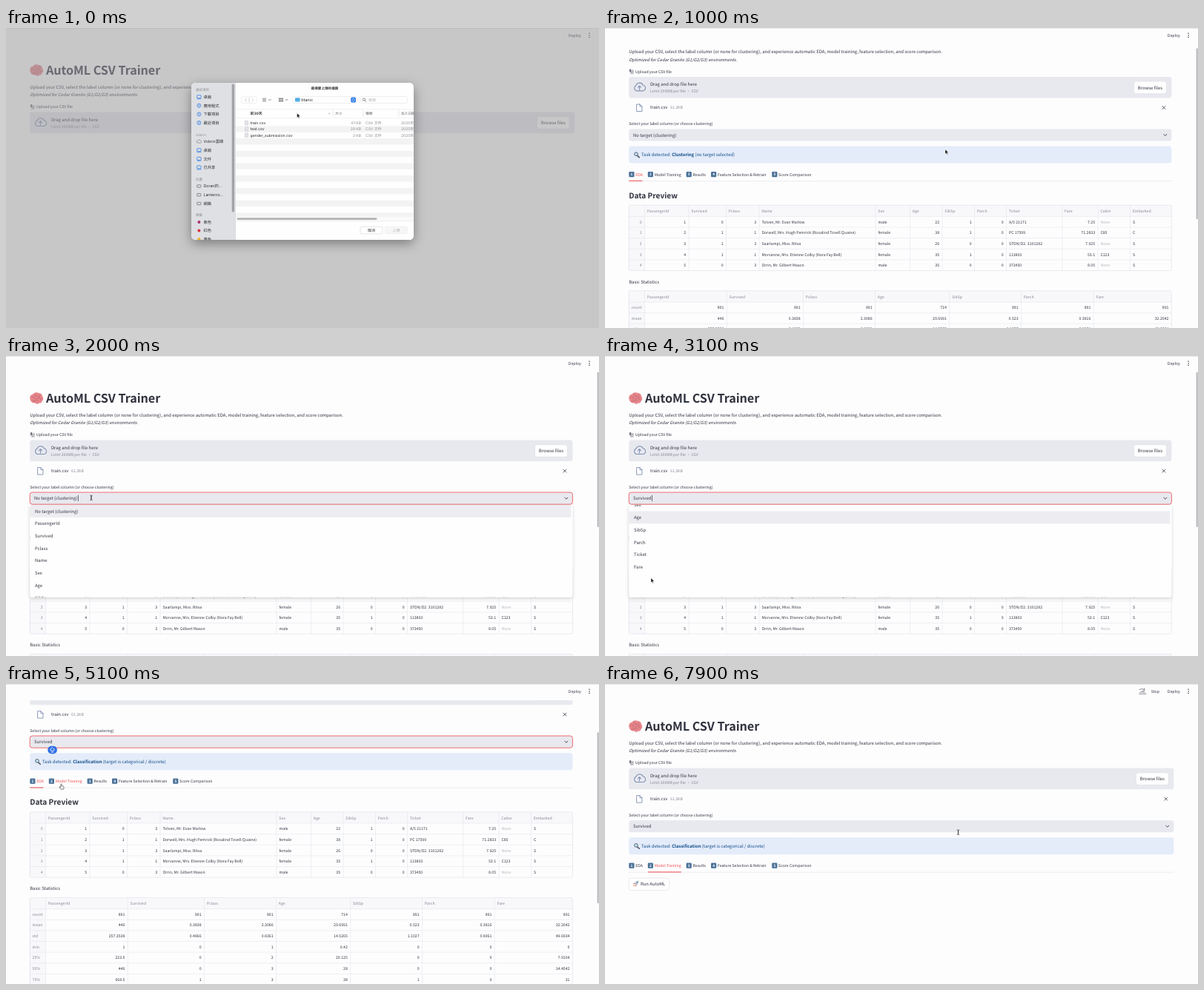
Recreate the animation shown at these times as an HTML page. Size 800x405 px, loop 8000 ms.

```html
<!DOCTYPE html>
<html lang="en">
<head>
<meta charset="utf-8">
<title>CSV Trainer</title>
<style>
html, body { margin: 0; width: 100%; height: 100%; overflow: hidden; background: #fdfdfe; }
svg { display: block; width: 100vw; height: 100vh; }
text {
  font-family: "Noto Sans CJK TC", "Noto Sans CJK SC", "Noto Sans CJK JP", "Noto Sans CJK", "Noto Sans", sans-serif;
  text-rendering: geometricPrecision; white-space: pre;
}
.ui text { font-family: Inter, "Noto Sans CJK TC", "Noto Sans CJK SC", "Noto Sans CJK JP", sans-serif; }
</style>
</head>
<body>
<svg id="stage" viewBox="0 0 800 405" xmlns="http://www.w3.org/2000/svg"></svg>
<script>
const LOOP = 8000, INK = '#31333f', GRAY = '#868892', RED = '#f04a4e', PANEL = '#e8e9ef', LINE = '#dfe0e6';
const BODY = 5.95, SMALL = 5.21, LEFT = 32.2, RIGHT = 764.4, ROW = 16.7, LIST_TOP = 201.1, LIST_END = 91.7;
const $ = id => document.getElementById(id);

// y is the middle of the capital letters
const text = (x, y, str, size = SMALL, fill = INK, more = '') =>
  `<text x="${x}" y="${(y + size * .37).toFixed(2)}" font-size="${size}" fill="${fill}" ${more}>${str}</text>`;
const rect = (x, y, w, h, fill, r = 0, more = '') =>
  `<rect x="${x}" y="${y}" width="${w}" height="${h}" rx="${r}" fill="${fill}" ${more}/>`;
const line = (d, stroke = LINE, width = .5, more = '') =>
  `<path d="${d}" fill="none" stroke="${stroke}" stroke-width="${width}" stroke-linecap="round" stroke-linejoin="round" ${more}/>`;
const shape = (d, fill, more = '') => `<path d="${d}" fill="${fill}" ${more}/>`;
const dot = (x, y, r, fill, more = '') => `<circle cx="${x}" cy="${y}" r="${r}" fill="${fill}" ${more}/>`;
const group = (id, body, more = '') => `<g id="${id}" ${more}>${body}</g>`;
const END = 'text-anchor="end"', MID = 'text-anchor="middle"', BOLD = 'font-weight="700"', WIDE = 'class="wide"';

function grid(top, edges, heads, rows, leftCols, indexEnd) {
  const pitch = 14.63, headH = 15.2, last = edges.length - 1;
  const bottom = top + headH + rows.length * pitch;
  let out = rect(edges[0], top, edges[last] - edges[0], headH, '#f8f8fb') +
    rect(edges[0], top, edges[1] - edges[0], bottom - top, '#f8f8fb');
  for (let y = top + headH; y < bottom - 2; y += pitch) out += line(`M${edges[0]} ${y}H${edges[last]}`);
  edges.slice(1, -1).forEach(x => out += line(`M${x} ${top}V${bottom}`));
  out += rect(edges[0], top, edges[last] - edges[0], bottom - top, 'none', 2.5, `stroke="${LINE}" stroke-width=".6"`);
  heads.forEach((h, i) => out += text(edges[i + 1] + 3.3, top + 8, h, SMALL, GRAY));
  rows.forEach((cells, r) => cells.forEach((cell, c) => {
    const y = top + headH + pitch * (r + .5);
    const isLeft = c ? leftCols.includes(c) : !indexEnd;
    const fill = cell === 'None' ? '#b4b5bc' : c ? INK : GRAY;
    out += text(isLeft ? edges[c] + 3.4 : edges[c + 1] - 3.9, y, cell, SMALL, fill, isLeft ? '' : END);
  }));
  return out;
}

const brain = shape('M32.5 58c-1-3 1-6 4-6.500c2-3 6-2.500 7.500-1.500c3 0 5 2 5 4.500c2 2 1.500 5.500-.5 6.500c0 2-2.500 3-4 2.500c-1 2-4 1.500-4.500 0c-3 .5-7-1-7.500-5.500Z', '#e5868b') +
  line('M35 56c2-2 4 0 3 2M39 52c0 2 2 3 4 2M43 57c2-1 4 0 4 2M36 61c2 0 3-1 5 0M41 57c-1 2 1 3 3 3M45 53c1 1 1 2 0 3', '#b95a66', .7);

const sheetIcon = shape('M34 103.500h4l1 1.500v5h-5Z', '#d4d6da') + line('M35 105.500h3M35 107h3M35 108.500h2', '#777', .4) + rect(33, 103, 2, 4, '#6f757e', .5);

const cloud = line('M42.500 132.500a4 4 0 0 1-.5-7.500a5 5 0 0 1 9.300-.2a3.900 3.900 0 0 1-.1 7.700Z', '#8291b3', 1.100) +
  line('M46.500 131v-5M44.500 127.700l2-2l2 2', '#8291b3', 1.100);

const uploader = text(41, 106.3, 'Upload your CSV file') + sheetIcon +
  rect(LEFT, 113.6, 732.2, 28.6, PANEL, 3.3, WIDE) + cloud +
  text(61, 123.4, 'Drag and drop file here', BODY) + text(61, 132.8, 'Limit 200MB per file • CSV', SMALL, GRAY) +
  group('browse', rect(713.4, 119.7, 44, 16.6, '#fefefe', 3.3, 'stroke="#d5d6dd" stroke-width=".5"') +
    text(735.4, 128, 'Browse files', BODY, INK, MID), 'class="right"');

const tabNames = [['EDA', 32.3], ['Model Training', 57.8], ['Results', 109.6], ['Feature Selection &amp; Retrain', 143], ['Score Comparison', 225.2]];
const tabs = line('M32 254.200H764.400', '#dcdde3', .5, 'id="tabLine"') + tabNames.map(([name, x], i) =>
  rect(x, 241.6, 7.2, 7.2, '#4b7298', 1.2) + text(x + 3.6, 245.2, i + 1, 4.8, '#fff', MID + ' ' + BOLD) +
  text(x + 8.9, 245.2, name, SMALL, INK, `id="tab${i}"`)).join('') + rect(32.2, 253.4, 18, 1, RED, 0, 'id="underline"');

const fileArea = line('M43 150.600h4l3 3v6.500h-7ZM47 150.600v3h3', '#8291b3', .9) +
  text(61, 154.8, 'train.csv', BODY) + text(88, 154.8, '61.2KB', SMALL, GRAY) +
  line('M751.800 153.100l4 4m0-4l-4 4', INK, .8, 'class="right"') +
  text(LEFT, 176.8, 'Select your label column (or choose clustering)') +
  rect(LEFT, 184, 732.2, 16.2, PANEL, 3.3, 'id="select" class="wide" stroke-width=".8"') +
  text(38, 192, '', BODY, INK, 'id="choice"') + rect(0, 187.8, .7, 8.4, INK, 0, 'id="caret"') +
  line('M753.800 191.200l2 1.900l2-1.900', INK, .9, 'class="right"') +
  rect(LEFT, 207.2, 732.2, 23, '#e4ecfa', 3.3, WIDE) +
  line('M43.500 219.700l2.800 2.600', '#454b55', 1.500) + dot(42, 217.8, 2.4, '#bcdcf0', 'stroke="#49525e" stroke-width=".8"') +
  text(49, 218.8, '', BODY, '#0c4a86', 'id="task"') + tabs;

const people = [
  '0|1|0|3|Tolven, Mr. Evan Marlow|male|22|1|0|A/5 21171|7.25|None|S',
  '1|2|1|1|Dorwell, Mrs. Hugh Pemrick (Rosalind Tovell Quaine)|female|38|1|0|PC 17599|71.2833|C85|C',
  '2|3|1|3|Saarlampi, Miss. Ritva|female|26|0|0|STON/O2. 3101282|7.925|None|S',
  '3|4|1|1|Morvanne, Mrs. Etienne Colby (Nora Fay Bell)|female|35|1|0|113803|53.1|C123|S',
  '4|5|0|3|Orrin, Mr. Gilbert Mason|male|35|0|0|373450|8.05|None|S'].map(r => r.split('|'));
const stats = [
  'count 891 891 891 714 891 891 891', 'mean 446 0.3838 2.3086 29.6991 0.523 0.3816 32.2042',
  'std 257.3538 0.4866 0.8361 14.5265 1.1027 0.8061 49.6934', 'min 1 0 1 0.42 0 0 0',
  '25% 223.5 0 2 20.125 0 0 7.9104', '50% 446 0 3 28 0 0 14.4542', '75% 668.5 1 3 38 1 0 31',
  'max 891 1 3 80 8 6 512.3292'].map(r => r.split(' '));
const columns = 'PassengerId Survived Pclass Name Sex Age SibSp Parch Ticket Fare Cabin Embarked'.split(' ');
const numeric = columns.filter(c => !/Name|Sex|Ticket|Cabin|Emb/.test(c));
const options = ['No target (clustering)', ...columns];

const eda = text(LEFT, 273.6, 'Data Preview', 10.15, INK, BOLD) +
  grid(286.8, [32.2, 53.5, 113, 163.5, 208, 365, 411.5, 455, 498.5, 541.5, 616.8, 665, 708.5, RIGHT], columns, people, [4, 5, 9, 11, 12], true) +
  text(LEFT, 390, 'Basic Statistics', BODY) +
  grid(402.4, [32.2, 53.5, 164.3, 267.5, 364.5, 464.7, 561.5, 659.2, RIGHT], numeric, stats, [], false);

const rocket = shape('M45.500 265.500c-3 0-5 2-6.200 4.500l2 2c2.500-1.200 4.500-3 4.200-6.500Z', '#bfc6ce') + dot(43.3, 267.8, .9, '#3f86b4') +
  shape('M40 268.500l-2.300 1l1.600.6ZM42.500 271.500l-1 2.300l-.6-1.800Z', '#c93b45') + shape('M39.300 271l-1.800 2.700l2.800-1.700Z', '#f19a38');
const model = rect(LEFT, 262, 54.6, 16.4, '#fefefe', 3.3, 'id="run" stroke="#d5d6dd" stroke-width=".5"') + rocket + text(48, 270, 'Run AutoML', BODY);

const list = rect(LEFT, 201, 732.2, 124.8, '#fefefe', 3, 'filter="url(#soft)"') +
  `<g clip-path="url(#listClip)">` + group('items', rect(LEFT, LIST_TOP, 730, ROW, '#ececf1', 0, 'id="hot"') +
  options.map((o, i) => text(39, LIST_TOP + ROW * (i + .5), o, BODY, INK, i > 10 ? 'class="late"' : '')).join('')) + '</g>';

const caps = rect(56.3, 197.8, 12.6, 10.4, '#2f6fe4', 5) + line('M62.600 199.800l3 3h-1.600v2h-2.800v-2h-1.600ZM61.200 206.200h2.800', '#fff', .7);

const poses = ['M725 7.500l-1 3l-3 2.500M724 10.500l3 1l-.5 2M722 8l3 .5l3 1', 'M725.500 7.500l-2 3l2 1.500l-3 1.500M723.500 10.500l-2.500 1M722 9l3-.5l2.500 2',
  'M725 7.500v3l-2 3M725 10.500l2 3M721.500 7l3.500 1.500l3.500-1.500', 'M720.500 13.300h9.500M721 7.500l4-1l3 2.500l-4 1.500l4 1M721.500 11.500l2.500-1'];
const header = rect(0, 0, 800, 22, '#fdfdfe') + rect(0, 0, 800, .7, '#e0e0e4') +
  text(758.8, 9.8, 'Deploy') + [7.2, 9.9, 12.6].map(y => dot(787, y, .75, INK)).join('') +
  group('busy', line('', '#70727c', .8, 'id="runner"') + dot(727.5, 6.8, .9, '#70727c') + text(736.7, 9.8, 'Stop'));

function dialogBody() {
  const blue = '#2d7be5', dim = '#8b8c91';
  const side = (y, label, icon) => text(266.4, y, label, 5.3, '#2b2c30') + icon(y);
  const box = y => rect(257.7, y - 2.3, 5.4, 4, 'none', .8, `stroke="${blue}" stroke-width=".8"`) + line(`M258 ${y + 2.7}h5`, blue, .7);
  const ring = y => dot(260.4, y, 2.5, 'none', `stroke="${blue}" stroke-width=".8"`) + line(`M260.400 ${y - 1.2}v2.200`, blue, .7);
  const puff = y => line(`M258.500 ${y + 1.5}a1.500 1.500 0 0 1 .2-3a2.200 2.200 0 0 1 3.900.3a1.400 1.400 0 0 1 .2 2.700Z`, '#7c7e84', .7);
  const disk = y => rect(257.8, y - 1.7, 5.2, 3.4, 'none', .6, 'stroke="#6f7177" stroke-width=".8"');
  const tag = color => y => dot(260.4, y, 2, color);
  const head = (y, s) => text(256, y, s, 4.5, dim);
  let out = rect(250, 74, 300, 212, '#fefefe') + rect(250, 74, 59.5, 212, '#dfe0e4') + line('M309.500 74V286', '#c9cacd', .5) +
    head(83.5, '喜好項目') + side(93, '桌面', box) + side(104.7, '應用程式', ring) + side(116.4, '下載項目', ring) + side(128, '最近項目', ring) +
    head(144, 'Vobrin') + side(153.5, 'Vobrin雲碟', puff) + side(165, '桌面', box) + side(176.6, '文件', box) + side(188.2, '已共享', box) +
    head(204, '位置') + side(213.5, 'Doran的...', disk) + side(225.2, 'Lanterno...', disk) + side(237, '網路', disk) +
    head(252, '標籤') + side(262, '紫色', tag('#a8326f')) + side(273.5, '紅色', tag('#dd3040')) + side(285, '黃色', tag('#e9b521')) +
    rect(304.7, 75.5, 3.4, 173, '#a2a3a7', 1.7);
  for (let i = 1; i < 16; i += 2) out += rect(310, 124 + 8.35 * i, 240, 8.35, '#f3f3f4');
  out += text(430, 81, '選擇要上傳的檔案', 4.6, '#333', MID + ' ' + BOLD) +
    rect(317.5, 92.5, 21, 9, '#fefefe', 2, 'stroke="#e3e3e5" stroke-width=".5"') + line('M324 95l-1.500 2l1.500 2M332 95l1.500 2l-1.500 2M328 94.500v5', '#b5b6b9', .6) +
    line('M346.500 95.200h4M346.500 97h4M346.500 98.800h4M354.500 96.300l1.400 1.400l1.400-1.400M377 96.300l1.400 1.400l1.400-1.400', '#55565a', .7) +
    [368, 370.2, 372.4].map(x => rect(x, 94.5, 1.6, 2, '#66676b') + rect(x, 97.4, 1.6, 2, '#66676b')).join('') +
    rect(386.5, 92.5, 87, 9, '#fefefe', 2, 'stroke="#dedee1" stroke-width=".5"') + rect(390, 94.2, 6.6, 5.4, '#55aee8', .8) +
    text(398.3, 97, 'titanic', 5.5, '#2b2c30') + rect(465.3, 93.6, 6.6, 6.8, blue, 1.5) + line('M467.200 96.300l1.400-1.300l1.400 1.300M467.200 97.700l1.400 1.300l1.400-1.300', '#fff', .7) +
    rect(478, 92.5, 63.5, 9, '#fefefe', 2, 'stroke="#dedee1" stroke-width=".5"') + dot(483, 96.6, 1.7, 'none', 'stroke="#66676b" stroke-width=".7"') +
    line('M484.300 97.900l1.500 1.500', '#66676b', .7) + text(489, 97, '搜尋', 5, '#b2b3b7') +
    line('M310 109.700H550M310 121.500H550', '#e4e4e6') + line('M441 111.500v8M482 111.500v8M530 111.500v8', '#d6d6d9') +
    text(329.5, 115.4, '前30天', 4.9, '#333', BOLD) + line('M434.800 116l1.300-1.200l1.300 1.200', dim, .6) +
    text(444, 115.4, '大小', 4.7, '#66676b') + text(485, 115.4, '種類', 4.7, '#66676b') + text(533, 115.4, '加入日期', 4.7, '#66676b');
  [['train.csv', '61 KB'], ['test.csv', '29 KB'], ['gender_submission.csv', '3 KB']].forEach(([name, size], i) => {
    const y = 128.1 + 8.35 * i;
    out += rect(322.3, y - 2.8, 4.4, 5.6, '#e3e4e7', .4, 'stroke="#b9babd" stroke-width=".4"') + text(329.5, y, name, 5.15, '#2b2c30') +
      text(479, y, size, 5, dim, END) + text(485, y, 'CSV 文件', 5, dim) + text(533, y, '2025年5月', 5, dim);
  });
  return out + rect(310, 255, 240, 5.4, '#fafafa') + rect(311.5, 256.3, 189, 2.6, '#b4b4b7', 1.3) + rect(310, 260.5, 240, 26, '#fefefe') + line('M310 260.700H550', '#dcdcdf') +
    rect(478, 268.3, 30, 9.6, '#fff', 2.2, 'stroke="#d3d3d6" stroke-width=".6"') + text(493, 273, '取消', 5.1, '#2b2c30', MID) +
    rect(511.3, 268.3, 30, 9.6, '#f6f6f7', 2.2, 'stroke="#ececee" stroke-width=".6"') + text(526.3, 273, '上傳', 5.1, '#b7b8bb', MID);
}
const dialog = rect(0, 0, 800, 405, '#99999c', 0, 'opacity=".54"') + rect(250, 74, 300, 212, '#fefefe', 6, 'filter="url(#deep)"') +
  `<g class="ui" clip-path="url(#dialogClip)">${dialogBody()}</g>`;

const cursors = {
  arrow: shape('M0 0v6l1.400-1.300l1 2.300l1-.45l-1-2.200h1.900Z', '#111', 'stroke="#fff" stroke-width=".4"'),
  beam: line('M-1.300-3.200q1.300 0 1.300.8v4.800q0 .8-1.300.8M1.300-3.200q-1.300 0-1.300.8v4.800q0 .8 1.300.8', '#222', .7),
  hand: shape('M-.7 0q.8-.9 1.500 0v2.200l2.100.5q.8.3.7 1.300l-.5 2.500h-3.600l-2-2.400q-.3-.9.6-.9l1.200.8Z', '#fff', 'stroke="#222" stroke-width=".6"')
};

$('stage').innerHTML = `<defs>
  <clipPath id="listClip">${rect(LEFT, 201, 732.2, 124.8, '#000', 3)}</clipPath>
  <clipPath id="dialogClip">${rect(250, 74, 300, 212, '#000', 6)}</clipPath>
  <filter id="soft" x="-5%" y="-10%" width="110%" height="130%"><feDropShadow dx="0" dy="1.600" stdDeviation="2" flood-opacity=".18"/></filter>
  <filter id="deep" x="-20%" y="-20%" width="140%" height="150%"><feDropShadow dx="0" dy="5" stdDeviation="8" flood-opacity=".38"/></filter></defs>` +
  rect(0, 0, 800, 405, '#fdfdfe') +
  group('page', brain + text(54, 57, 'AutoML CSV Trainer', 16.25, INK, BOLD + ' letter-spacing="-.09"') +
    text(LEFT, 79.5, 'Upload your CSV, select the label column (or none for clustering), and experience automatic EDA, model training, feature selection, and score comparison.', BODY) +
    text(LEFT, 90, 'Optimized for Cedar Granite (G1/G2/G3) environments.', 5.75, INK, 'font-style="italic"') + uploader +
    group('fileArea', fileArea) + group('eda', eda) + group('model', model) + group('list', list) + group('caps', caps)) +
  rect(797.6, 0, 2.2, 231, '#b9babf', 1.1, 'id="thumb"') + header + group('dialog', dialog) +
  Object.keys(cursors).map(k => group(k, cursors[k])).join('');

const mouseKeys = [[0, 392.6, 115], [200, 345, 126], [450, 345, 126], [800, 459, 164], [1250, 459, 164], [1700, 115, 191.3],
  [2050, 115, 191.3], [2300, 52, 242], [2500, 52, 242], [2730, 58, 192], [2830, 58, 192], [2950, 62, 299.7], [3300, 62, 299.7],
  [3500, 46, 284], [3650, 46, 284], [3980, 127.3, 198.3], [4320, 127.3, 198.3], [4500, 54, 242], [4650, 54, 242], [4950, 74.5, 135.5],
  [5320, 74.5, 135.5], [5750, 60, 270], [5980, 60, 270], [6300, 62, 240], [6700, 36, 205], [7200, 118, 225], [7850, 476.5, 200.2]];
const scrollKeys = [[850, 0], [1000, 47.6], [1250, 114], [1350, 114], [1700, 0], [4800, 0], [5050, 114]];
const openTimes = [[1850, 2400], [2830, 3620], [4100, 4600]];
const busyTimes = [[600, 800], [2430, 2650], [3640, 3900], [4620, 4850], [5950, LOOP]];
const LOADED = 600, TAB_CLICK = 5220;

const within = (t, spans) => spans.some(([a, b]) => t >= a && t < b);
const smooth = (t, a, b) => { const p = Math.min(1, Math.max(0, (t - a) / (b - a))); return p * p * (3 - 2 * p); };
function track(keys, t) {
  let i = keys.findIndex(k => k[0] > t);
  if (i < 0) i = keys.length;
  const from = keys[Math.max(0, i - 1)], to = keys[Math.min(i, keys.length - 1)];
  const p = from === to ? 0 : smooth(t, from[0], to[0]);
  return from.slice(1).map((v, n) => v + (to[n + 1] - v) * p);
}
const show = (id, on) => $(id).style.display = on ? '' : 'none';
const set = (id, name, value) => $(id).setAttribute(name, value);
const rightItems = document.querySelectorAll('.right'), wideItems = document.querySelectorAll('.wide'), lateItems = document.querySelectorAll('.late');

function render(t) {
  const loaded = t >= LOADED, onModel = t >= TAB_CLICK, hasBar = loaded && !onModel;
  const scroll = onModel ? 0 : track(scrollKeys, t)[0], extra = hasBar ? 0 : 2.9;
  const [mx, my] = track(mouseKeys, t);
  const open = within(t, openTimes), chosen = t < 2400 ? 0 : t >= 3620 && t < 4600 ? 10 : 2;

  set('page', 'transform', `translate(0 ${-scroll})`);
  show('fileArea', loaded); show('eda', hasBar); show('model', onModel); show('thumb', hasBar);
  set('thumb', 'y', scroll * .572);
  rightItems.forEach(e => e.setAttribute('transform', `translate(${extra} 0)`));
  wideItems.forEach(e => e.setAttribute('width', 732.2 + extra));
  set('tabLine', 'd', `M32 254.200H${RIGHT + extra}`);

  const focused = t >= 1850 && !onModel;
  set('select', 'stroke', focused ? RED : 'none');
  $('choice').textContent = options[chosen];
  show('caret', open);
  if (open) set('caret', 'x', 38.7 + $('choice').getComputedTextLength());
  $('task').innerHTML = 'Task detected: ' + (chosen === 0 ? '<tspan font-weight="700">Clustering</tspan> (no target selected)' :
    chosen === 2 ? '<tspan font-weight="700">Classification</tspan> (target is categorical / discrete)' :
    '<tspan font-weight="700">Regression</tspan> (target is continuous)');

  show('list', open);
  const listScroll = t < 3700 ? LIST_END * smooth(t, 2960, 3080) : 0, settled = t >= 3200;
  const hover = Math.floor((my + 2 - LIST_TOP + (settled ? listScroll : 0)) / ROW);
  set('items', 'transform', `translate(0 ${-listScroll})`);
  set('hot', 'y', LIST_TOP + ROW * (my > 203 ? hover : chosen));
  lateItems.forEach(e => e.style.display = settled ? '' : 'none');
  show('caps', t >= 4650 && !onModel);

  const overTab = t >= 4900 && !onModel;
  set('tab0', 'fill', onModel ? INK : RED);
  set('tab1', 'fill', onModel || overTab ? RED : INK);
  const slide = smooth(t, TAB_CLICK, TAB_CLICK + 150);
  set('underline', 'x', 32.2 + 25.6 * slide);
  set('underline', 'width', 18.3 + 26.7 * slide);
  const overRun = t > 5650 && t < 6080;
  set('run', 'stroke', overRun ? RED : '#d5d6dd');

  show('busy', within(t, busyTimes));
  set('runner', 'd', poses[Math.floor(t / 100) % poses.length]);
  $('dialog').style.opacity = 1 - smooth(t, 350, 470);
  show('dialog', t < 470);

  const pageY = my + scroll;
  const kind = overRun || (t >= 4930 && t < 5400) ? 'hand' : loaded && pageY > 184 && pageY < 201.5 ? 'beam' : 'arrow';
  Object.keys(cursors).forEach(k => show(k, k === kind));
  set(kind, 'transform', `translate(${mx} ${my})`);
}

const start = performance.now();
function tick() {
  render((performance.now() - start) % LOOP);
  requestAnimationFrame(tick);
}
render(0);
requestAnimationFrame(tick);
</script>
</body>
</html>
```
